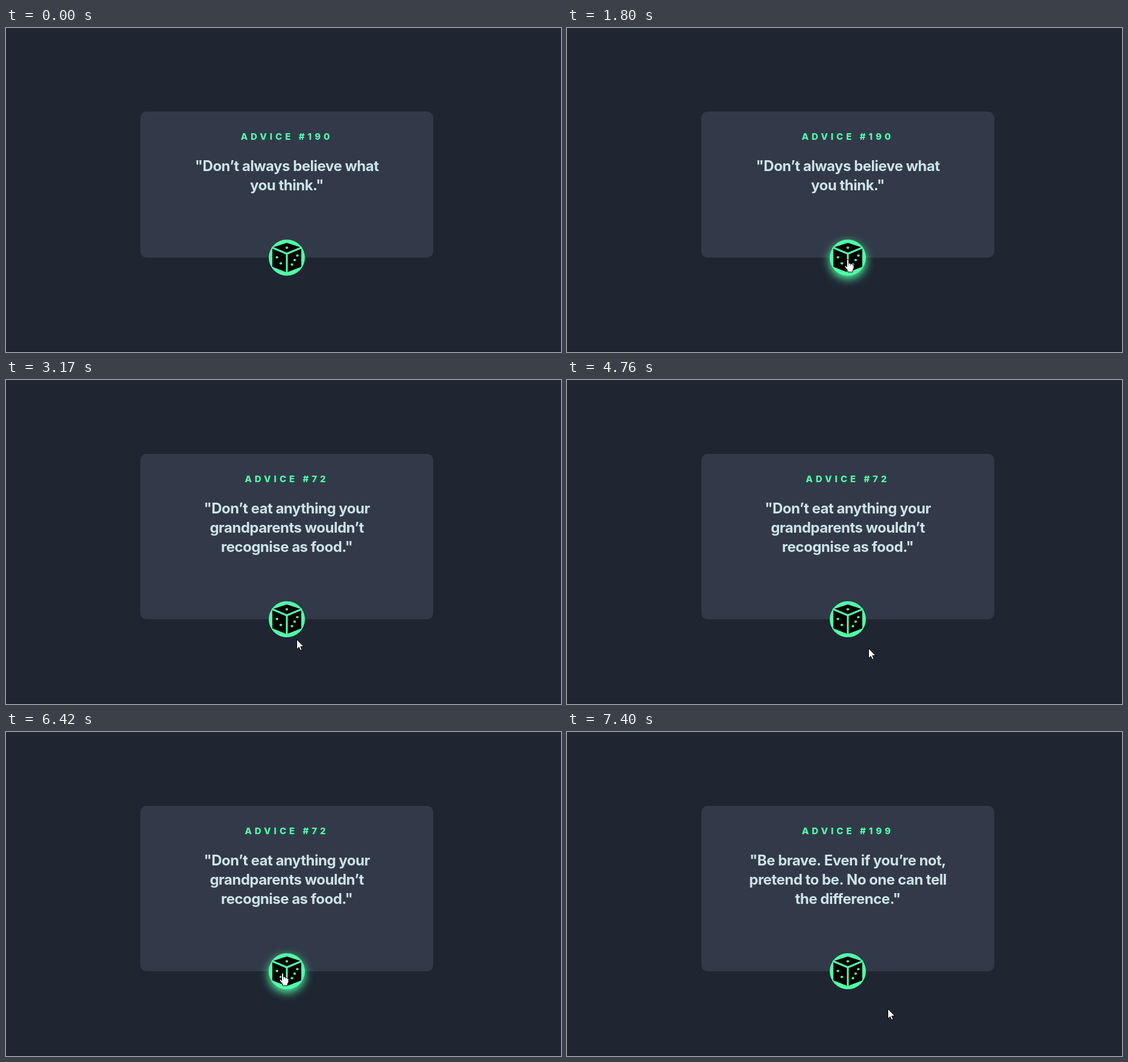
These frames come from a looping animation (921x539 px, 8 s). An HTML page with a canvas:

```html
<!DOCTYPE html>
<html lang="en">
<head>
<meta charset="utf-8">
<title>Advice generator</title>
<style>
  html, body { margin: 0; width: 100%; height: 100%; overflow: hidden; background: #1f2632; }
  canvas { display: block; }
</style>
</head>
<body>
<canvas id="stage" width="921" height="539"></canvas>
<script>
const ctx = document.getElementById('stage').getContext('2d');
const LOOP = 8000, CENTER = 466, STEP = 68, LINE = 32;
const GREEN = '#52ffa8', CYAN = '#cee3e9', NIGHT = '#1f2632', SLATE = '#323a49';

const advices = [
  { from: 0, id: 190, lines: ['"Don’t always believe what', 'you think."'] },
  { from: 2650, id: 72, lines: ['"Don’t eat anything your', 'grandparents wouldn’t', 'recognise as food."'] },
  { from: 6750, id: 199, lines: ['"Be brave. Even if you’re not,', 'pretend to be. No one can tell', 'the difference."'] }
];

// Each move eases out from where the last one ended; power 1 is linear.
const entry = { x: 880, y: 559 };
const moves = [
  { start: 260, end: 870, x: 493, y: 436, power: 3 },
  { start: 1060, end: 1600, x: 466, y: 385, power: 3 },
  { start: 2650, end: 3170, x: 483, y: 432, power: 1 },
  { start: 3240, end: 3440, x: 501, y: 447, power: 1 },
  { start: 5480, end: 6210, x: 459, y: 401, power: 2 },
  { start: 6750, end: 7400, x: 533, y: 461, power: 1 }
];

const arrow = new Path2D('M0 0V16.5L3.7 13 6.1 18.5 8.6 17.4 6.3 12H11.5Z');
const hand = new Path2D('M4.5 13V2Q4.5.5 6 .5T7.5 2V7Q10 6 10.5 8 13 7 13.5 9 16 8.5 16 11V15L14 19V21.5H6V19L1.5 13.5Q.5 11 2.5 11Z');
const knuckles = new Path2D('M7.5 7V11M10.5 8V11M13.5 9V11');
const cube = new Path2D('M0-23.5L23-16V14.5L0 23.5-23 14.5V-16Z');
const cubeEdges = new Path2D('M-25-17L0-6.5 25-17M0-6.5V26');

const mix = (a, b, k) => a + (b - a) * k;

function pointerAt(t) {
  const i = moves.findLastIndex(m => t >= m.start);
  if (i < 0) return null;
  const from = moves[i - 1] || entry, to = moves[i];
  const elapsed = (Math.floor((t - to.start) / STEP) + 1) * STEP;
  const p = Math.min(1, elapsed / (to.end - to.start));
  const k = 1 - (1 - p) ** to.power;
  return { x: Math.round(mix(from.x, to.x, k)), y: Math.round(mix(from.y, to.y, k)) };
}

function text(str, y, font, spacing, color) {
  ctx.font = font + ' Inter, sans-serif';
  ctx.letterSpacing = spacing;
  ctx.fillStyle = color;
  ctx.fillText(str, CENTER, y);
}

// Draws the centred card and returns its bottom edge.
function drawCard({ id, lines }) {
  const height = 179 + LINE * lines.length;
  const top = Math.floor(260.5 - height / 2);
  ctx.fillStyle = SLATE;
  ctx.beginPath();
  ctx.roundRect(223, top, 486, height, 10);
  ctx.fill();
  text('ADVICE #' + id, top + 46.5, '800 15px', '5px', GREEN);
  lines.forEach((line, i) => text(line, top + 99 + LINE * i, '700 24px', '-0.5px', CYAN));
  return top + height;
}

function dot(x, y, r) {
  ctx.beginPath();
  ctx.arc(x, y, r, 0, 2 * Math.PI);
  ctx.fill();
}

function drawDie() {
  ctx.fillStyle = ctx.strokeStyle = '#000';
  ctx.lineWidth = 2;
  ctx.lineJoin = 'round';
  ctx.fill(cube);
  ctx.stroke(cube);
  ctx.fillStyle = ctx.strokeStyle = GREEN;
  ctx.lineWidth = 3;
  ctx.lineJoin = 'miter';
  ctx.stroke(cubeEdges);
  dot(0, -16.5, 2.1);
  for (const side of [-1, 1]) dot(-13.2 + 3.2 * side, 4.5 + 5 * side, 2.1);
  for (const side of [-1, 0, 1]) dot(13 + 4.5 * side, 4 - 7.5 * side, 2.1);
}

function drawButton(y, glowing) {
  ctx.save();
  ctx.translate(CENTER, y);
  ctx.fillStyle = GREEN;
  if (glowing) {
    ctx.shadowColor = GREEN;
    ctx.shadowBlur = 15;
    ctx.shadowOffsetY = 5;
  }
  dot(0, 0, 30);
  ctx.shadowColor = 'transparent';
  drawDie();
  ctx.restore();
}

function drawPointer({ x, y }, isHand) {
  const shape = isHand ? hand : arrow;
  ctx.save();
  ctx.translate(x - (isHand ? 6 : 0.5), y - 0.5);
  ctx.fillStyle = '#fff';
  ctx.strokeStyle = '#000';
  ctx.lineWidth = 1;
  ctx.fill(shape);
  ctx.stroke(shape);
  if (isHand) {
    ctx.strokeStyle = '#777';
    ctx.stroke(knuckles);
  }
  ctx.restore();
}

function draw(t) {
  ctx.fillStyle = NIGHT;
  ctx.fillRect(0, 0, 921, 539);
  ctx.fillStyle = '#1b212b';
  ctx.fillRect(0, 538, 921, 1);
  ctx.textAlign = 'center';

  const buttonY = drawCard(advices.findLast(a => t >= a.from));
  const pointer = pointerAt(t);
  const over = pointer && Math.hypot(pointer.x - CENTER, pointer.y - buttonY) < 27;
  drawButton(buttonY, over && t >= 1800);
  if (pointer) drawPointer(pointer, over);
}

const begin = performance.now();
function tick() {
  draw((performance.now() - begin) % LOOP);
  requestAnimationFrame(tick);
}
tick();
</script>
</body>
</html>
```
